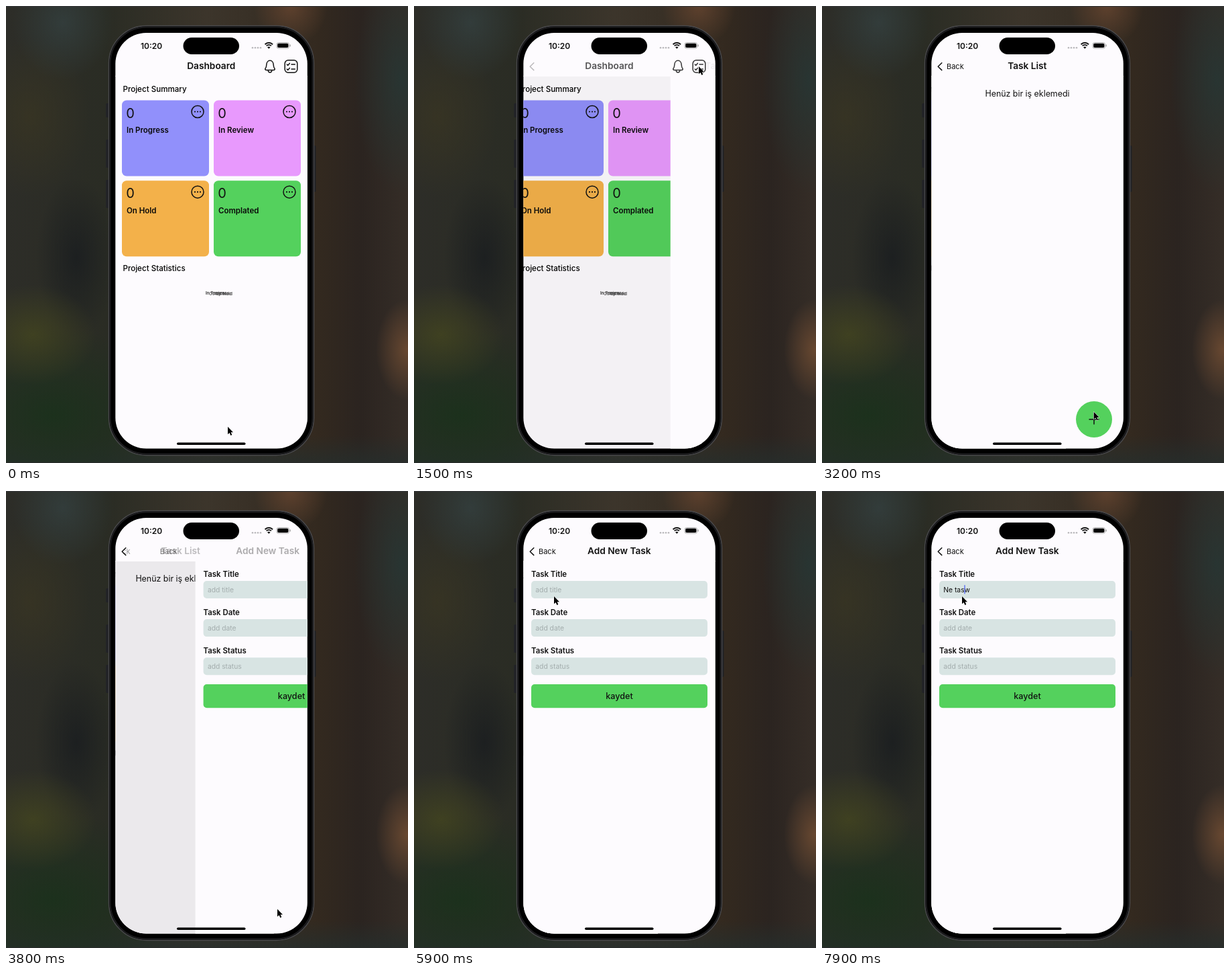
Animation of 600x681 px, one loop 8000 ms. Source, as an HTML page:

```html
<!DOCTYPE html>
<html lang="en">
<head>
<meta charset="utf-8">
<title>Task app demo</title>
<style>
html, body { margin: 0; width: 100%; height: 100%; overflow: hidden; background: #29271f; }
#stage {
  position: absolute; left: 0; top: 0; width: 600px; height: 681px; overflow: hidden;
  background:
    radial-gradient(ellipse 46px 75px at 598px 512px, rgba(112,76,50,.85), transparent),
    radial-gradient(ellipse 55px 60px at 425px 0, rgba(104,70,48,.8), transparent),
    radial-gradient(ellipse 75px 85px at 85px 25px, rgba(52,64,64,.8), transparent),
    radial-gradient(ellipse 70px 170px at 590px 110px, rgba(38,54,52,.85), transparent),
    radial-gradient(ellipse 90px 120px at 35px 165px, rgba(58,54,34,.7), transparent),
    radial-gradient(ellipse 95px 75px at 40px 490px, rgba(66,68,32,.85), transparent),
    radial-gradient(ellipse 200px 130px at 70px 610px, rgba(27,49,28,.95), transparent),
    radial-gradient(ellipse 60px 120px at 105px 375px, rgba(27,30,32,.9), transparent),
    linear-gradient(transparent 640px, rgba(38,46,44,.8) 681px),
    linear-gradient(90deg, #2d2d28, #2a2c24 150px, #3c352b 300px, #33291f 465px, #2b2420 530px, #352d27);
}
svg { position: absolute; left: 0; top: 0; }
text { font-family: Inter, "Liberation Sans", sans-serif; fill: #111; white-space: pre; }
.title { font-size: 13.7px; font-weight: 600; text-anchor: middle; }
.back { font-size: 11px; }
.head { font-size: 11.6px; font-weight: 500; fill: #000; }
.card { font-size: 11.5px; font-weight: 600; fill: #0a0a0a; }
.count { font-size: 20px; }
.tiny { font-size: 6.6px; fill: #444; }
.label { font-size: 11.4px; font-weight: 600; }
.field { font-size: 10.3px; }
.hint { fill: #a3adad; }
.line { fill: none; stroke: #111; stroke-width: 1.5; stroke-linecap: round; stroke-linejoin: round; }
</style>
</head>
<body>
<div id="stage">
<svg id="art" width="600" height="681" viewBox="0 0 600 681"></svg>
</div>
<script>
const LOOP = 8000, STEP = 100, SCREEN = 286.5;
const PAPER = '#fdfbfe', GREEN = '#54d15d', MINT = '#d8e4e3';

const rect = (x, y, w, h, r, fill, more = '') =>
  `<rect x="${x}" y="${y}" width="${w}" height="${h}" rx="${r}" fill="${fill}" ${more}/>`;
const dot = (x, y, r, fill) => `<circle cx="${x}" cy="${y}" r="${r}" fill="${fill}"/>`;
const text = (cls, x, y, s, more = '') => `<text class="${cls}" x="${x}" y="${y}" ${more}>${s}</text>`;
const line = (d, more = '') => `<path class="line" d="${d}" ${more}/>`;
const group = (id, inner, more = '') => `<g id="${id}" ${more}>${inner}</g>`;
const page = (id, inner) => group(id,
  rect(163, 104, 287, 557, 0, PAPER) + inner +
  rect(163, 104, 287, 557, 0, '#000', 'class="dim" opacity="0"'));

function card(x, y, fill, name) {
  const cx = x + 113, cy = y + 17;
  return rect(x, y, 130, 113, 7, fill) +
    text('count', x + 6.3, y + 26, '0') +
    text('card', x + 7, y + 48.7, name) +
    `<circle class="line" cx="${cx}" cy="${cy}" r="9" stroke-width="1.4"/>` +
    [-4, 0, 4].map(d => dot(cx + d, cy, 1.1, '#111')).join('');
}

function formRow(i, name, hint) {
  const y = 134 + i * 57.1;
  return text('label', 175, y - 6.4, name) + rect(175, y, 263, 26, 5, MINT) +
    text('field hint', 181.3, y + 16.8, hint, `id="hint${i}"`);
}

const dashboard = page('dash',
  text('head', 174.5, 127.7, 'Project Summary') +
  card(173, 140.5, '#9190fb', 'In Progress') + card(310, 140.5, '#e899fd', 'In Review') +
  card(173, 260.2, '#f3b14a', 'On Hold') + card(310, 260.2, GREEN, 'Complated') +
  text('head', 174.5, 394.7, 'Project Statistics') +
  text('tiny', 298, 430, 'In Progress') + text('tiny', 298, 430, 'In Review') +
  text('tiny', 303, 430.5, 'Complated') + text('tiny', 338, 430.5, 'On Hold', 'text-anchor="end"'));

const taskList = page('list',
  text('', 306.5, 135.4, 'Henüz bir iş eklemedi', 'font-size="12.4" text-anchor="middle"') +
  dot(406, 616, 27, GREEN) + line('M399 616h14M406 609v14'));

const form = page('form',
  formRow(0, 'Task Title', 'add title') +
  formRow(1, 'Task Date', 'add date') +
  formRow(2, 'Task Status', 'add status') +
  rect(175, 288, 263, 35.3, 5, GREEN) +
  text('', 306.5, 310.4, 'kaydet', 'font-size="12.6" font-weight="500" text-anchor="middle"') +
  text('field', 181.3, 150.8, '', 'id="typed"') +
  rect(0, 140, 1.4, 13.5, .7, '#5a6bf2', 'id="caret"'));

const tools = group('tools',
  line('M388.6 95.5h10.8c1.7 0 2.4-1.3 1.4-2.5c-1.5-1.8-1.5-3-1.6-5.4c-.1-3.6-2.2-6.3-5.2-6.3s-5.1 2.7-5.2 6.3c-.1 2.4-.1 3.6-1.6 5.4c-1 1.2-.3 2.5 1.4 2.5z', 'stroke-width="1.3"') +
  line('M391.2 96c.3 4 5.3 4 5.6 0') +
  '<rect class="line" x="416.2" y="80.7" width="18.6" height="18.6" rx="5"/>' +
  line('M419.3 87l1.4 1.4l2.6-3M419.3 94l1.4 1.4l2.6-3M426 87h5.3M426 94h5.3'));

const bar = rect(163, 40, 287, 65, 0, PAPER) +
  text('title', 306.3, 94, 'Dashboard', 'id="title0"') +
  text('title', 306.3, 94, 'Task List', 'id="title1"') +
  text('title', 306.3, 94, 'Add New Task', 'id="title2"') +
  group('clipBack', text('back', 186, 94, 'Back', 'id="back1"'), 'clip-path="url(#backEdge)"') +
  text('back', 186, 94, 'Back', 'id="back2"') +
  line('M178.8 84.8l-5.6 5.4l5.6 5.4', 'id="chevron"') + tools;

const arc = (r) => {
  const d = r * .72;
  return `M${392.3 - d} ${63 - d}A${r} ${r} 0 0 1 ${392.3 + d} ${63 - d}`;
};
const status = text('', 217, 63.6, '10:20', 'font-size="12" font-weight="600" text-anchor="middle"') +
  rect(264.5, 47, 83.5, 25, 12.5, '#000') +
  [0, 1, 2, 3].map(i => dot(368 + i * 4, 62.2, 1.3, '#b9b8bb')).join('') +
  `<path d="${arc(8)}${arc(5)}" fill="none" stroke="#111" stroke-width="1.9"/>` +
  '<path d="M392.3 63.8l-2.2-2.3a3.1 3.1 0 0 1 4.4 0z" fill="#111"/>' +
  rect(404, 54.6, 18.6, 8.6, 2.8, 'none', 'stroke="#999" stroke-width=".8"') +
  rect(405.2, 55.8, 16.2, 6.2, 1.8, '#000') + rect(423.6, 57.3, 1.2, 3.2, .6, '#999');

const sideButtons = [[149, 145, 21], [149, 199, 42], [149, 259, 42], [457.5, 208, 69]]
  .map(([x, y, h]) => rect(x, y, 5, h, 1.5, '#222327')).join('');

document.getElementById('art').innerHTML =
  '<defs><clipPath id="glass">' + rect(163.3, 40, SCREEN, 619.5, 46, '#000') + '</clipPath>' +
  '<clipPath id="backEdge">' + rect(175, 76, 275, 29, 0, '#000') + '</clipPath></defs>' +
  rect(0, 0, 600, 1.2, 0, '#363739') + rect(0, 680, 600, 1, 0, '#2a2c2c') +
  sideButtons +
  rect(153.5, 29.5, 306, 640, 56, '#000', 'stroke="#4b4b4e" stroke-width="1.4"') +
  rect(155.5, 31.5, 302, 636, 54, 'none', 'stroke="#1c1c1e" stroke-width="2"') +
  group('screen', dashboard + taskList + form + bar + status +
    rect(255, 650.6, 102.5, 3.4, 1.7, '#000'), 'clip-path="url(#glass)"') +
  group('cursor', '<path d="M0 0V11.2L2.6 8.9L4.4 12.9L6.3 12.1L4.6 8.2H8Z" fill="#000" stroke="#fff" stroke-width="1" stroke-linejoin="round" paint-order="stroke"/>');

const el = {};
document.querySelectorAll('[id]').forEach(n => el[n.id] = n);

const clamp = v => Math.max(0, Math.min(1, v));
const smooth = v => { v = clamp(v); return v * v * (3 - 2 * v); };
const shift = (node, x, y = 0) => node.setAttribute('transform', `translate(${x} ${y})`);
const fade = (node, v) => node.setAttribute('opacity', clamp(v));

// Critically damped spring used by the page push.
function push(t, start) {
  const s = Math.max(0, t - start) * 0.0183;
  return 1 - (1 + s) * Math.exp(-s);
}
const dimming = p => 0.1 * Math.pow(p, 0.65);
const titleOut = p => -88 * Math.pow(p, 1.22);

// time, x, y
const path = [
  [0, 331, 627], [300, 331, 627], [1100, 425, 90], [2400, 425, 90],
  [3300, 405, 623], [3800, 405, 623], [4100, 220, 65], [4600, 209, 157], [LOOP, 209, 157]
];
function cursorAt(t) {
  const i = path.findIndex(k => k[0] > t);
  const [t0, x0, y0] = path[i - 1], [t1, x1, y1] = path[i];
  const e = smooth((t - t0) / (t1 - t0));
  return [x0 + (x1 - x0) * e, y0 + (y1 - y0) * e];
}

const WORDS = 'Ne tasw', FOCUS = 6100, TYPE = 6700, KEY = 200;
const typedAt = t => WORDS.slice(0, Math.max(0, Math.floor((t - TYPE) / KEY) + 1));

function drawTyping(t) {
  const now = typedAt(t);
  // The caret follows each letter one step late.
  el.typed.textContent = typedAt(t - STEP);
  const w = el.typed.textContent ? el.typed.getComputedTextLength() : 0;
  el.typed.textContent = now;
  el.caret.setAttribute('x', 181 + w);
  const blink = t >= TYPE || (t - FOCUS) % 1000 < 500;
  fade(el.caret, t >= FOCUS && blink ? 1 : 0);
  fade(el.hint0, now ? 0 : 1);
}

function draw(t) {
  const p = push(t, 1450), q = push(t, 3693);
  shift(el.dash, -0.3 * SCREEN * p);
  shift(el.list, SCREEN * (1 - p) - 0.3 * SCREEN * q);
  shift(el.form, SCREEN * (1 - q));
  fade(el.dash.querySelector('.dim'), dimming(p));
  fade(el.list.querySelector('.dim'), dimming(q));

  shift(el.title0, titleOut(p));
  fade(el.title0, 1 - 1.25 * p);
  shift(el.title1, 205 * (1 - p) + titleOut(q));
  fade(el.title1, p * p * (1 - 1.25 * q));
  shift(el.title2, 202 * (1 - q));
  fade(el.title2, q * q);

  shift(el.back1, 105 * (1 - p) - 45 * q);
  fade(el.back1, smooth((p - .25) / .6) * (1 - q));
  shift(el.back2, 105 * (1 - q));
  fade(el.back2, smooth((q - .25) / .6));
  fade(el.chevron, p * 1.2);
  fade(el.tools, 1 - Math.pow(p, 1.3));

  drawTyping(t);
  shift(el.cursor, ...cursorAt(t));
}

const begin = performance.now();
function frame() {
  const t = (performance.now() - begin) % LOOP;
  draw(Math.floor(t / STEP) * STEP);
  requestAnimationFrame(frame);
}
frame();
</script>
</body>
</html>
```
